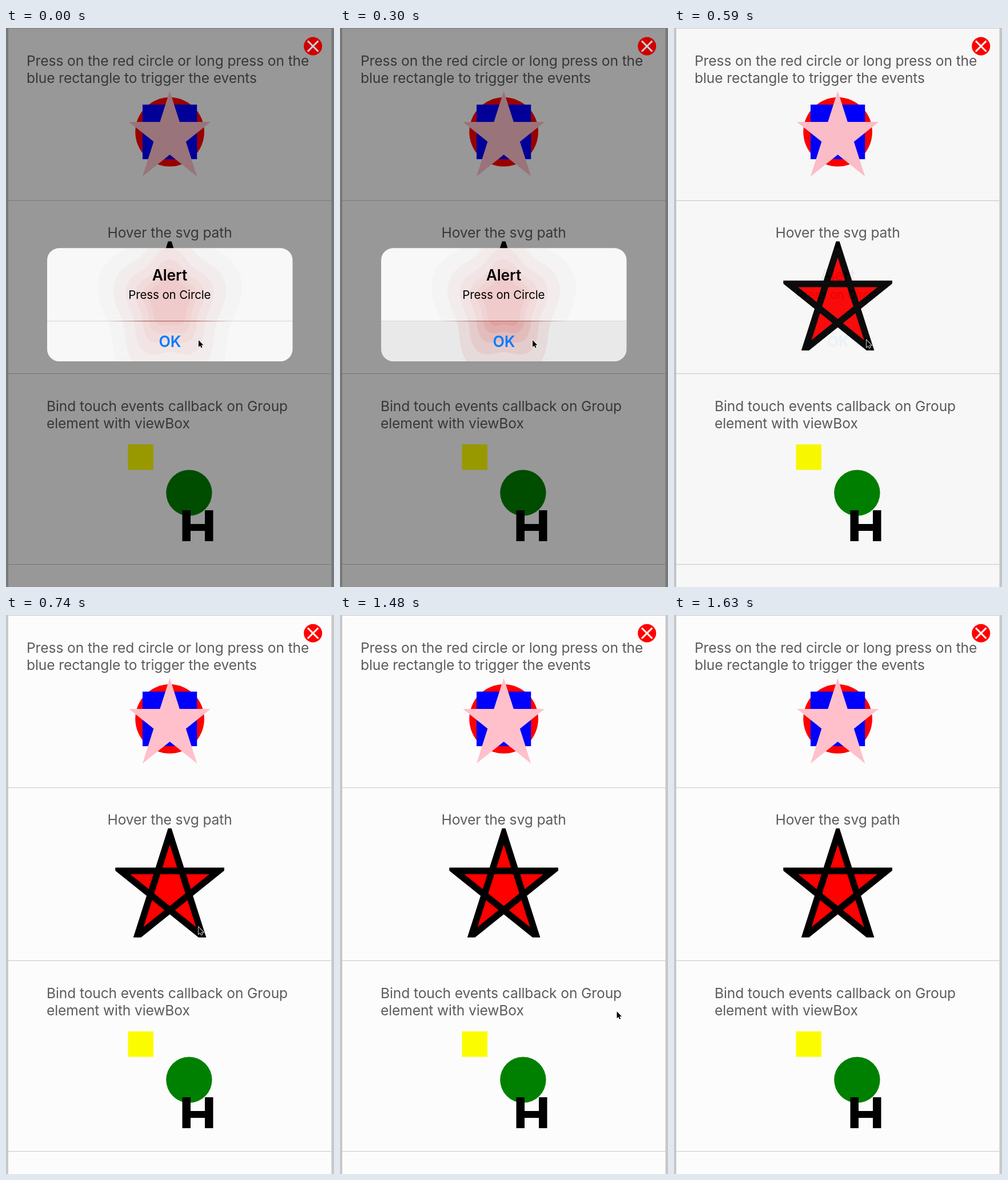
Write an HTML page that moves like this. It is 574 px wide and 976 px high and loops after 2420 ms.

```html
<!DOCTYPE html>
<html lang="en">
<head>
<meta charset="utf-8">
<title>SVG touch events</title>
<style>
  html, body { margin: 0; width: 100%; height: 100%; overflow: hidden; background: #c8c8c8; }
  svg { display: block; }
  text { font-family: Inter, "Liberation Sans", sans-serif; font-optical-sizing: none; }
  .label { font-size: 24.6px; letter-spacing: -.12px; fill: #5c5c5c; }
  .mid { text-anchor: middle; }
  .strong { font-size: 26.5px; font-weight: 600; letter-spacing: -.15px; }
  .message { font-size: 20.5px; letter-spacing: -.12px; }
  #alert { isolation: isolate; }
  #pressed { mix-blend-mode: multiply; }
</style>
</head>
<body>
<svg width="574" height="976" viewBox="0 0 574 976">
  <defs>
    <polygon id="star" points="50,5 20,99 95,39 5,39 80,99"/>
    <clipPath id="card"><rect x="72" y="384.3" width="429.5" height="197.7" rx="21"/></clipPath>
    <clipPath id="button"><rect x="72" y="512" width="430" height="71"/></clipPath>
    <linearGradient id="seam">
      <stop offset="0" stop-color="#a04a4a" stop-opacity="0"/>
      <stop offset=".3" stop-color="#a04a4a"/>
      <stop offset=".7" stop-color="#a04a4a"/>
      <stop offset="1" stop-color="#a04a4a" stop-opacity="0"/>
    </linearGradient>
  </defs>

  <rect width="574" height="976" fill="#c8c8c8"/>
  <rect x="4" width="565.5" height="976" fill="#fcfcfc"/>
  <path d="M4 .5H569.5M4 301.5H569.5M4 603.5H569.5M4 936.5H569.5" stroke="#c8c8c8"/>

  <g class="label">
    <text x="36" y="65.7">Press on the red circle or long press on the</text>
    <text x="36" y="95.9">blue rectangle to trigger the events</text>
    <text class="mid" x="286.6" y="366.2">Hover the svg path</text>
    <text x="71" y="668.7">Bind touch events callback on Group</text>
    <text x="71" y="698.9">element with viewBox</text>
  </g>

  <svg x="207.2" y="102" width="158.8" height="158.8" viewBox="0 0 100 100">
    <circle cx="50" cy="50" r="38" fill="red"/>
    <rect x="20" y="20" width="60" height="60" fill="blue"/>
    <use href="#star" fill="pink"/>
  </svg>
  <svg x="191.3" y="372.4" width="190.6" height="190.6" viewBox="0 0 100 100">
    <use href="#star" fill="red" stroke="#000" stroke-width="6"/>
  </svg>

  <rect x="213.5" y="727" width="44.5" height="44.5" fill="#fcfc00"/>
  <circle cx="320.4" cy="811.6" r="40.2" fill="green"/>
  <path d="M308.5 842H323V866H348V842H362.5V896H348V878H323V896H308.5Z"/>

  <rect id="dim" width="574" height="976"/>

  <circle cx="537.2" cy="31.8" r="16" fill="red"/>
  <path d="M528 22.6L546.4 41M546.4 22.6L528 41" stroke="#fff" stroke-width="3"/>
  <circle id="iconDim" cx="537.2" cy="31.8" r="16"/>

  <g id="alert">
    <g clip-path="url(#card)">
      <rect x="72" y="384" width="430" height="199" fill="#f8f8f8"/>
      <g id="glow"></g>
      <g id="pressed" clip-path="url(#button)">
        <rect x="72" y="512" width="430" height="71" fill="#f0f0f0"/>
        <use href="#glow"/>
      </g>
      <rect x="72" y="511.3" width="430" height="1" fill="#d0d0d0"/>
      <rect id="redSeam" x="180" y="511.3" width="213" height="1" fill="url(#seam)"/>
    </g>
    <text class="mid strong" x="286.4" y="441.4">Alert</text>
    <text class="mid message" x="286.4" y="473.4">Press on Circle</text>
    <text class="mid strong" x="286.9" y="557" fill="#007aff">OK</text>
  </g>

  <path id="cursor" d="M0 0V12L2.8 9.4L4.7 13.5L6.6 12.7L4.8 8.7H8.5Z" stroke="#fff" stroke-width="1.6" paint-order="stroke"/>
</svg>

<script>
const LOOP = 2420;
const CHANGES = [0, 300, 440, 590, 740, 880, 1030, 1480, 1630];
const [dim, iconDim, alertBox, glow, pressed, redSeam, cursor] =
  ['dim', 'iconDim', 'alert', 'glow', 'pressed', 'redSeam', 'cursor'].map(id => document.getElementById(id));

// The star seen through frosted glass: shrinking five-lobed rings, each pinker than the last.
function ring(level) {
  const size = 150 * .78 ** level;
  const points = Array.from({ length: 90 }, (_, i) => {
    const angle = i / 90 * 2 * Math.PI;
    const r = size * (1 + .09 * Math.cos(5 * angle));
    return [286.6 + .8 * r * Math.sin(angle), 486 - 1.5 * level - r * Math.cos(angle)];
  });
  const tint = 244 - 8.2 * level;
  const shape = document.createElementNS(glow.namespaceURI, 'polygon');
  shape.setAttribute('points', points.join(' '));
  shape.setAttribute('fill', `rgb(${244 - level} ${tint} ${tint})`);
  return shape;
}
for (let level = 0; level < 6; level++) glow.append(ring(level));

function fadeAt(time) {
  if (time < 440) return 1;
  const phase = Math.min(1, (time - 228) / 419);
  return (1 + Math.cos(Math.PI * phase)) / 2;
}

function cursorAt(time) {
  if (time < 880) return [337, 545];
  if (time < 1030) return [355.5, 533];
  return time < 1480 ? [362, 533] : [484.5, 692.3];
}

function draw(now) {
  const elapsed = now % LOOP;
  const time = CHANGES.findLast(change => change <= elapsed);
  const fade = fadeAt(time);
  const frosted = time < 440;

  dim.style.opacity = .4 * fade;
  iconDim.style.opacity = Math.min(.19, .4 * fade);
  alertBox.style.opacity = fade;
  glow.style.opacity = redSeam.style.opacity = Number(frosted);
  pressed.style.opacity = Number(frosted && time >= 300);
  cursor.style.opacity = Number(time < 1630);
  cursor.setAttribute('transform', `translate(${cursorAt(time)})`);
}

const start = performance.now();
function tick() {
  draw(performance.now() - start);
  requestAnimationFrame(tick);
}
tick();
</script>
</body>
</html>
```
